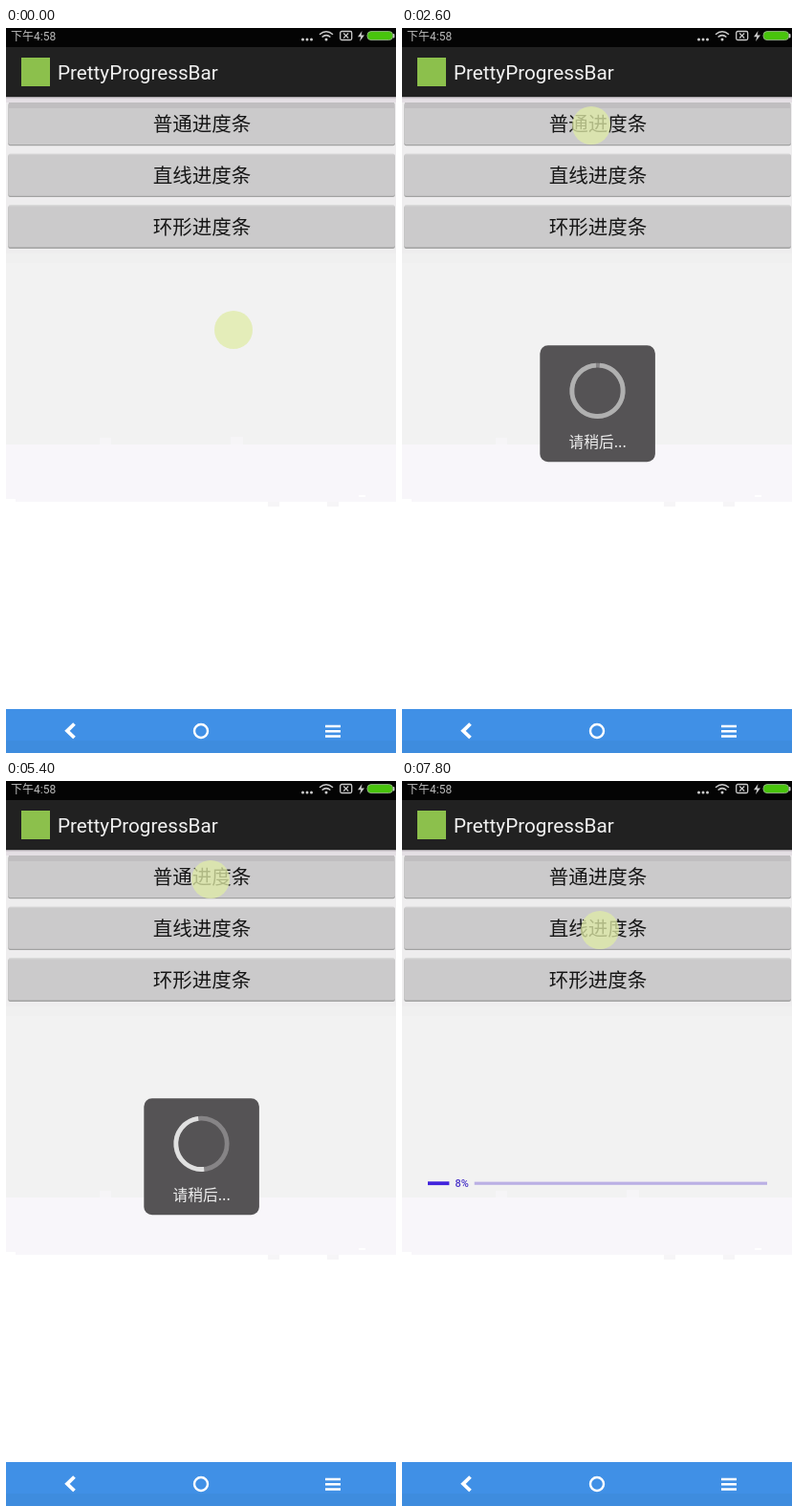
Animation, 408 px wide and 759 px high, one loop 8 s. Source, as an HTML page:

```html
<!DOCTYPE html>
<html lang="zh">
<head>
<meta charset="utf-8">
<title>PrettyProgressBar</title>
<style>
  html, body { margin: 0; width: 100%; height: 100%; overflow: hidden; background: #fff; }
  svg { display: block; width: 100%; height: 100%; }
  text { font-family: Roboto, "Noto Sans CJK SC", "Noto Sans CJK", sans-serif; }
  .label { font-family: "Noto Sans CJK SC", "Noto Sans CJK", sans-serif; text-anchor: middle; }
  .line { fill: none; stroke: #fff; }
</style>
</head>
<body>
<svg viewBox="0 0 408 759">
  <!-- page bands -->
  <rect width="408" height="759" fill="#fff"/>
  <rect y="72" width="408" height="174" fill="#eeedee"/>
  <rect y="236" width="408" height="200" fill="#f2f2f2"/>
  <rect y="236" width="408" height="10" fill="#f0f0f0"/>
  <rect y="436" width="408" height="60" fill="#f8f6fa"/>
  <rect y="493" width="10" height="3" fill="#fff"/>
  <g fill="#f6f5f7">
    <rect x="98" y="429" width="12" height="7"/>
    <rect x="235" y="428" width="13" height="8"/>
    <rect x="274" y="496" width="12" height="5"/>
    <rect x="336" y="496" width="12" height="5"/>
  </g>
  <rect x="369" y="489" width="7" height="2" fill="#fff"/>

  <!-- status bar and header -->
  <rect width="408" height="20" fill="#040404"/>
  <rect y="20" width="408" height="52.5" fill="#212121"/>
  <rect y="72.5" width="408" height="1.5" fill="#d6ced5"/>
  <rect y="74" width="408" height="4" fill="#e4dfe4"/>
  <text x="5" y="13" font-size="12" fill="#bcbcbc">下午4:58</text>
  <g fill="#ccc">
    <circle cx="310.5" cy="12" r="1.5"/><circle cx="315" cy="12" r="1.5"/><circle cx="319.5" cy="12" r="1.5"/>
    <circle cx="335" cy="12" r="1.5"/>
    <path d="M372.5 3 368 9.2h3.2L370 14l5-6.5h-3.3z"/>
    <rect x="404.5" y="6" width="2" height="4.4" rx="1"/>
  </g>
  <g fill="none" stroke="#ccc" stroke-width="1.5">
    <path d="M328 6.8Q335 .8 342 6.8M330.6 9.5Q335 5.8 339.4 9.5"/>
    <rect x="349.7" y="3.5" width="12" height="9" rx="1.5" stroke-width="1.3"/>
    <path d="M353.2 5.5 358.2 10.5M358.2 5.5 353.2 10.5" stroke-width="1.2"/>
  </g>
  <rect x="378" y="3.6" width="26.6" height="9" rx="4" fill="#48c40c" stroke="#8fb080"/>
  <rect x="16" y="31" width="30" height="30" fill="#8cc04c"/>
  <text x="54" y="54.3" font-size="20.7" fill="#f1f1f1">PrettyProgressBar</text>

  <g id="buttons"></g>

  <!-- percent bar -->
  <g id="bar">
    <rect id="done" x="27" y="419.3" height="3.8" fill="#4224dc"/>
    <text id="pct" y="425" font-size="11" font-weight="500" fill="#4a34c8"></text>
    <rect id="rest" y="419.6" height="3.2" fill="#bbb0e4"/>
  </g>

  <!-- waiting box -->
  <g id="dialog">
    <rect x="144.3" y="332.3" width="120.6" height="122" rx="8.5" fill="#555355"/>
    <g fill="none" stroke-width="4.8">
      <circle cx="204.5" cy="379.8" r="26.7" stroke="#868486"/>
      <circle id="arc" cx="204.5" cy="379.8" r="26.7" pathLength="360"/>
    </g>
    <text class="label" x="204.7" y="438.7" font-size="15.7" fill="#eee">请稍后...</text>
  </g>

  <circle id="touch" r="20" fill="rgb(224,235,167)" fill-opacity=".76"/>

  <!-- navigation -->
  <rect y="713" width="408" height="46" fill="#4090e6"/>
  <rect y="746" width="408" height="13" fill="#3e8cde"/>
  <path class="line" d="M71.5 728.5 64 735.8 71.5 743" stroke-width="3.8"/>
  <circle class="line" cx="204" cy="736" r="7" stroke-width="2.4"/>
  <path class="line" d="M334 731h16M334 736.2h16M334 741.4h16" stroke-width="2.5"/>
</svg>
<script>
const LOOP = 8000, STEP = 200;
const $ = id => document.getElementById(id);
const set = (el, attrs) => { for (const k in attrs) el.setAttribute(k, attrs[k]); };
const show = (el, on) => el.style.display = on ? '' : 'none';

$('buttons').innerHTML = ['普通进度条', '直线进度条', '环形进度条'].map((name, i) => {
  const y = 78 + 53.8 * i;
  return `<rect x="2.3" y="${y + 1}" width="404.6" height="44.3" rx="2" fill="#a2a2a2"/>
    <rect class="face" x="2.3" y="${y}" width="404.6" height="44" rx="2" fill="#cbcacb"/>
    <rect x="3" y="${y}" width="403" height="1" fill="#d4d4d4"/>
    ${i ? '' : '<rect x="3" y="78" width="403" height="6" fill="#c0bec0"/>'}
    <text class="label" x="205" y="${y + 30.3}" font-size="20.5" fill="#161616">${name}</text>`;
}).join('');
const firstFace = document.querySelector('.face');

// time, x, y of the touch spot
const path = [
  [0, 238, 316], [200, 236, 300], [400, 228, 245], [600, 216, 175], [800, 205, 115],
  [1000, 202, 85], [1200, 204, 87], [1400, 203, 90], [1600, 203, 90], [1800, 198, 102],
  [4400, 198, 102], [4800, 222, 102], [5000, 230, 103], [5400, 214, 103],
  [6000, 210, 98], [6400, 211, 99], [6600, 212, 130], [6800, 207, 156], [8000, 207, 156]
];
// moments at which the ring begins to fill again
const fills = [1380, 2630, 3880, 4780];

function along(t) {
  const i = path.findIndex(p => p[0] > t);
  const [a, b] = [path[i - 1], path[i]];
  const k = (t - a[0]) / (b[0] - a[0]);
  return [a[1] + (b[1] - a[1]) * k, a[2] + (b[2] - a[2]) * k];
}

function drawRing(t) {
  const begin = fills.filter(f => f <= t).pop();
  const sweep = Math.min(352, (t - begin) * 0.288);
  const grey = Math.min(245, Math.round(232 - (sweep - 148) * 0.276));
  const turn = 5 + (t - 2600) * 0.189 - 90;
  set($('arc'), {
    stroke: `rgb(${grey},${grey},${grey})`,
    'stroke-dasharray': `${sweep} 360`,
    transform: `rotate(${turn} 204.5 379.8)`
  });
}

function drawBar(t) {
  const percent = Math.floor((t - 7000) / 100);
  const done = Math.max(0, 355 * percent / 100 - 6);
  const textX = done ? 27 + done + 6 : 27;
  $('pct').textContent = percent + '%';
  set($('pct'), { x: textX });
  const restX = textX + $('pct').getComputedTextLength() + 6;
  set($('done'), { width: done });
  set($('rest'), { x: restX, width: 382 - restX });
}

function draw(now) {
  const t = Math.floor(now % LOOP / STEP) * STEP;
  const [x, y] = along(t);
  set($('touch'), { cx: x, cy: y });
  set(firstFace, { fill: t === 6000 ? '#b7b6b7' : '#cbcacb' });
  const waiting = t >= 2000 && t < 6200, counting = t >= 7200;
  show($('dialog'), waiting);
  show($('bar'), counting);
  if (waiting) drawRing(t);
  if (counting) drawBar(t);
}

const origin = performance.now();
function tick() {
  draw(performance.now() - origin);
  requestAnimationFrame(tick);
}
tick();
</script>
</body>
</html>
```
